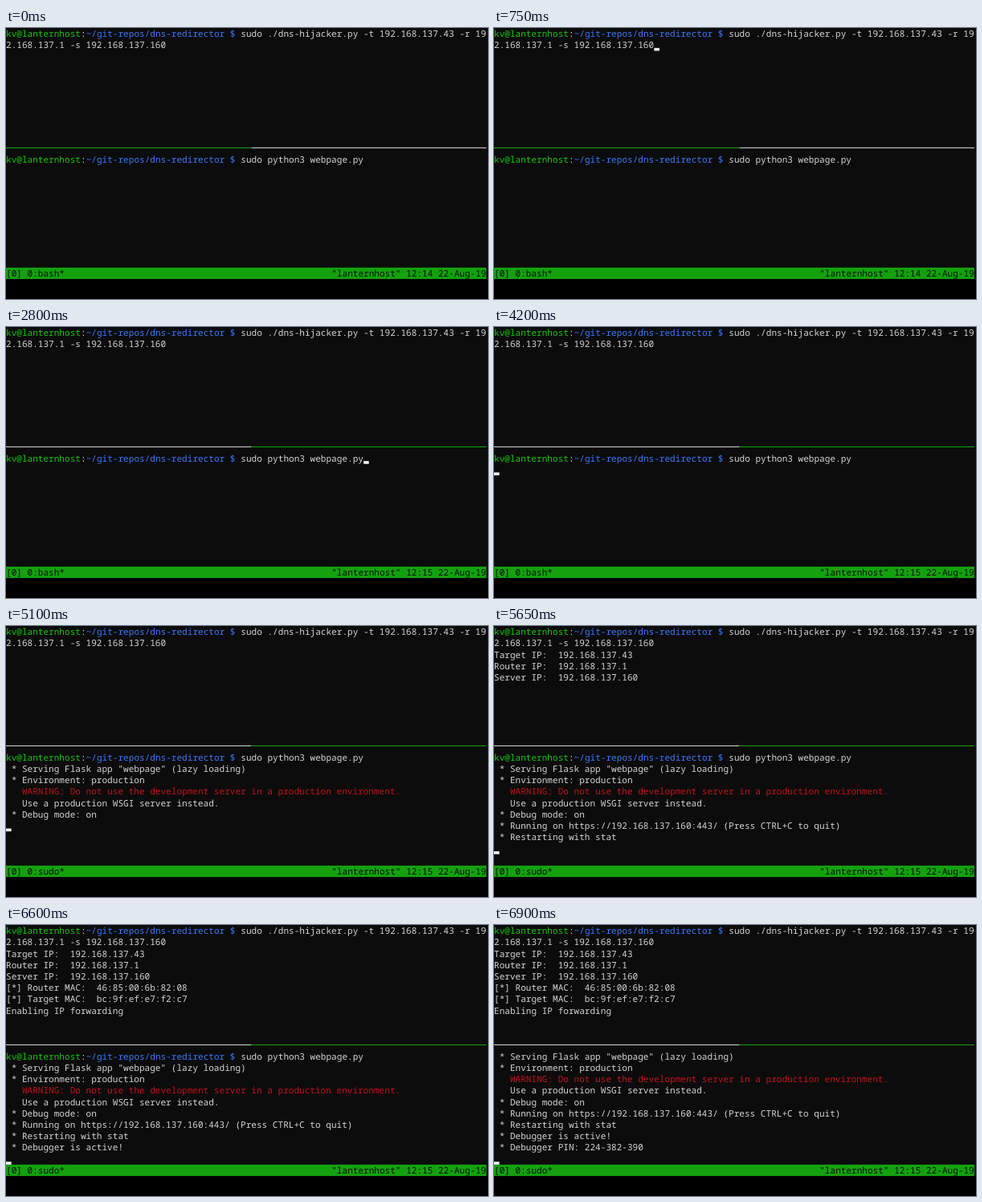
Recreate the animation shown at these times as an HTML page with a canvas. Size 600 px wide and 338 px high, loop 8 s.

```html
<!DOCTYPE html>
<html lang="en">
<head>
<meta charset="utf-8">
<title>Split terminal</title>
<style>
  html, body { margin: 0; width: 100%; height: 100%; overflow: hidden; background: #000; }
  canvas { display: block; width: 600px; height: 338px; }
</style>
</head>
<body>
<canvas id="stage" width="600" height="338"></canvas>
<script>
const ctx = document.getElementById('stage').getContext('2d');

const LOOP = 8000;
const COLS = 90, CELL = 6.643, ROW = 14.23, BASELINE = 11.1;
const DIVIDER_ROW = 10, LOWER_ROW = 11, STATUS_ROW = 21, SPLIT_COL = 46;
const HOST = 'lanternhost';
const COLOR = {
  back: '#0c0c0c', text: '#d4d4d4', cursor: '#f2f2f2',
  user: '#16c60c', path: '#3b78ff', warn: '#c50f1f', bar: '#13a10e'
};

// Times at which each step of the session happens, in ms
const AT = {
  blink: 700, runHijacker: 1400, minute: 2450, switchPane: 2800, runServer: 3800,
  serving: 5100, running: 5200, addresses: 5550, macs: 6250, debuggerOn: 6600, pin: 6800
};

function write(row, col, text, color = COLOR.text) {
  ctx.fillStyle = color;
  ctx.fillText(text, col * CELL, Math.round(row * ROW + BASELINE));
}

function prompt(row, command) {
  const parts = [
    ['kv@' + HOST, COLOR.user], [':', COLOR.text],
    ['~/git-repos/dns-redirector $', COLOR.path], [' ' + command, COLOR.text]
  ];
  let col = 0;
  for (const [text, color] of parts) {
    write(row, col, text, color);
    col += text.length;
  }
}

function cursor(row, col) {
  ctx.fillStyle = COLOR.cursor;
  ctx.fillRect(col * CELL, (row + 1) * ROW - 3.6, CELL, 3.6);
}

function upperPane(t) {
  prompt(0, 'sudo ./dns-hijacker.py -t 192.168.137.43 -r 19');
  write(1, 0, '2.168.137.1 -s 192.168.137.160');
  const lines = [];
  if (t >= AT.addresses) lines.push(
    'Target IP:  192.168.137.43',
    'Router IP:  192.168.137.1',
    'Server IP:  192.168.137.160');
  if (t >= AT.macs) lines.push(
    '[*] Router MAC:  46:85:00:6b:82:08',
    '[*] Target MAC:  bc:9f:ef:e7:f2:c7',
    'Enabling IP forwarding');
  lines.forEach((line, i) => write(2 + i, 0, line));
}

function serverOutput(t) {
  const lines = [];
  if (t >= AT.serving) lines.push(
    ' * Serving Flask app "webpage" (lazy loading)',
    ' * Environment: production',
    '   WARNING: Do not use the development server in a production environment.',
    '   Use a production WSGI server instead.',
    ' * Debug mode: on');
  if (t >= AT.running) lines.push(
    ' * Running on https://192.168.137.160:443/ (Press CTRL+C to quit)',
    ' * Restarting with stat');
  if (t >= AT.debuggerOn) lines.push(' * Debugger is active!');
  if (t >= AT.pin) lines.push(' * Debugger PIN: 224-382-390');
  return lines;
}

function lowerPane(t, lines) {
  const scrolled = t >= AT.pin;
  const first = LOWER_ROW + (scrolled ? 0 : 1);
  if (!scrolled) prompt(LOWER_ROW, 'sudo python3 webpage.py');
  lines.forEach((line, i) =>
    write(first + i, 0, line, line.includes('WARNING') ? COLOR.warn : COLOR.text));
  return first + lines.length;
}

function divider(lowerActive) {
  const y = Math.floor((DIVIDER_ROW + 0.5) * ROW), split = SPLIT_COL * CELL;
  ctx.fillStyle = lowerActive ? COLOR.text : COLOR.bar;
  ctx.fillRect(0, y, split, 1);
  ctx.fillStyle = lowerActive ? COLOR.bar : COLOR.text;
  ctx.fillRect(split, y, COLS * CELL - split, 1);
}

function statusBar(t) {
  ctx.fillStyle = COLOR.bar;
  ctx.fillRect(0, STATUS_ROW * ROW, COLS * CELL, ROW);
  write(STATUS_ROW, 0, `[0] 0:${t >= AT.serving ? 'sudo' : 'bash'}*`, COLOR.back);
  const right = `"${HOST}" 12:${t >= AT.minute ? 15 : 14} 22-Aug-19`;
  write(STATUS_ROW, COLS - right.length, right, COLOR.back);
}

function draw(t) {
  ctx.fillStyle = '#000';
  ctx.fillRect(0, 0, 600, 338);
  ctx.fillStyle = COLOR.back;
  ctx.fillRect(0, 0, 600, (STATUS_ROW + 1) * ROW);
  ctx.font = `500 ${CELL / 0.6}px "Noto Sans Mono", "DejaVu Sans Mono", monospace`;
  ctx.textRendering = 'geometricPrecision';

  upperPane(t);
  const nextRow = lowerPane(t, serverOutput(t));
  divider(t >= AT.switchPane);
  statusBar(t);

  if (t >= AT.runServer) cursor(nextRow, 0);
  else if (t >= AT.switchPane) cursor(LOWER_ROW, 67);
  else if (t >= AT.runHijacker) cursor(2, 0);
  else if (t >= AT.blink) cursor(1, 30);
}

function tick() {
  draw(performance.now() % LOOP);
  requestAnimationFrame(tick);
}
tick();
</script>
</body>
</html>
```
